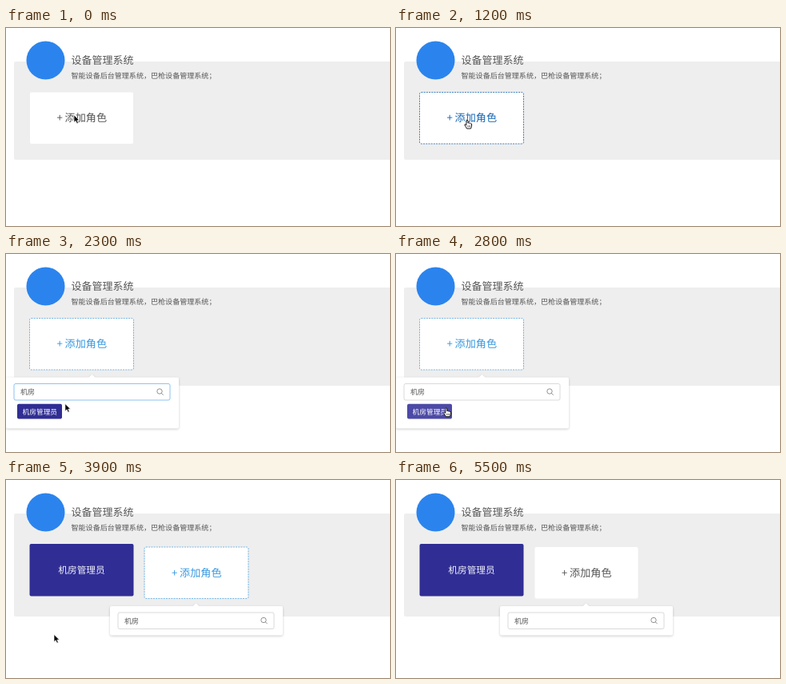
Write an HTML page that moves like this. It is 480 px wide and 248 px high and loops after 5.6 s.

```html
<!DOCTYPE html>
<html lang="zh-CN">
<head>
<meta charset="utf-8">
<title>设备管理系统</title>
<style>
html, body { margin: 0; width: 100%; height: 100%; overflow: hidden; background: #fff; }
svg { display: block; width: 100%; height: 100%; }
text { font-family: "Noto Sans CJK SC", "Noto Sans CJK", "Noto Sans", sans-serif; fill: #555; text-rendering: geometricPrecision; }
.mid { text-anchor: middle; }
.pop { filter: drop-shadow(0 1px 1.5px rgba(0, 0, 0, .2)); }
</style>
</head>
<body>
<svg viewBox="0 0 480 248">
  <rect width="480" height="248" fill="#fff"/>
  <rect id="panel" x="10" y="42" width="474" rx="2" fill="#eee"/>
  <circle cx="49.5" cy="40.5" r="24" fill="#2b84ee"/>
  <text x="81.5" y="45" font-size="13">设备管理系统</text>
  <text x="81.5" y="62.700" font-size="9.050">智能设备后台管理系统，巴枪设备管理系统；</text>

  <g id="role">
    <rect x="29.5" y="80" width="130" height="65.500" rx="2" fill="#302e94"/>
    <text class="mid" x="94.5" y="117" font-size="11.700" style="fill:#f1f1fa">机房管理员</text>
  </g>

  <g id="add">
    <rect x="30" y="80.500" width="129" height="64.500" rx="2" fill="#fff"/>
    <rect id="dash" x="29.5" y="80.500" width="130" height="64.500" rx="2" fill="none" stroke-width=".9" stroke-dasharray="2 1.2"/>
    <text id="label" class="mid" x="94.700" y="117" font-size="13.100">+ 添加角色</text>
  </g>

  <g id="popup">
    <g class="pop" fill="#fff">
      <path d="M102.500 155.500l5-4.500 5 4.500z"/>
      <rect id="card" x="0" y="154.500" width="216" rx="2"/>
    </g>
    <rect id="input" x="10" y="162.500" width="195" height="20.500" rx="2" fill="#fff" stroke-width=".9"/>
    <text id="query" x="18" y="176" font-size="9"></text>
    <g fill="none" stroke="#777" stroke-width=".8">
      <circle cx="192" cy="172" r="3.200"/>
      <path d="M194.300 174.300l2.400 2.400"/>
    </g>
    <g id="result">
      <rect id="tag" x="14" y="187.800" width="56" height="18.700" rx="2"/>
      <text class="mid" x="42.300" y="200.500" font-size="8.700" style="fill:#fff">机房管理员</text>
    </g>
  </g>

  <circle id="ring" r="20" fill="none" stroke="#222" stroke-width="1.300"/>
  <g id="arrow">
    <path d="M0 0v9.300l2.200-2 1.500 3.400 1.700-.7-1.500-3.300h2.900z" fill="#000" stroke="#fff" stroke-width=".7"/>
  </g>
  <g id="hand">
    <path d="M-1 1Q0-.600 1 1V4Q2 3.200 2.700 4.300 3.700 3.700 4.300 4.800 5.700 4.400 5.700 6 5.700 8.800 4.500 11H-.600Q-1.300 8.900-3 7-3.600 5.500-2.300 5.500L-1 6.500z" fill="#fff" stroke="#000" stroke-width=".9"/>
    <path d="M.8 7v2.300M2.300 7v2.300M3.800 7v2.300" stroke="#000" stroke-width=".5"/>
  </g>
</svg>
<script>
const LOOP = 5600, STEP = 100;
const OPEN = 1300, FOUND = 1800, CLICK = 3700, ADDED = 3900, EXIT = 5500;
const $ = id => document.getElementById(id);
const set = (id, attrs) => { for (const k in attrs) $(id).setAttribute(k, attrs[k]); };
const show = (id, on) => set(id, { opacity: +on });
const within = (t, a, b) => t >= a && t < b;
const ease = p => p * p * (3 - 2 * p);
const ramp = (t, a, b) => Math.min(1, Math.max(0, (t - a) / (b - a)));
const pulse = (t, a, b, c, d) => ramp(t, a, b) * (1 - ramp(t, c, d));
const blend = (a, b, p) => a.map((v, i) => v + (b[i] - v) * p);
const rgb = c => `rgb(${c.map(Math.round)})`;

const GREY = [85, 85, 85], BLUE = [56, 152, 224], PRESSED = [22, 103, 181];
const LINE = [214, 214, 214], FOCUS = [127, 189, 240];
const NAVY = [48, 46, 148], VIOLET = [76, 74, 166];

// time, x, y of the pointer tip
const PATH = [
  [0, 85, 109], [600, 89, 115], [1400, 89, 115], [1900, 90, 158],
  [2400, 72, 191], [2800, 62.8, 192.7], [3000, 62.5, 192.7], [3200, 60, 193.5],
  [4400, 60, 193.5], [4600, 255, 200], [4800, 400, 210], [5000, 441, 219], [5500, 447, 248]
];

function pointer(t) {
  const i = PATH.findIndex(k => k[0] > t);
  if (i < 0) return PATH[PATH.length - 1].slice(1);
  const [t0, ...from] = PATH[i - 1], [t1, ...to] = PATH[i];
  const p = ramp(t, t0, t1);
  return blend(from, to, t < 4400 ? ease(p) : p);
}

function typed(t) {
  if (t < 1500) return "";
  if (t < 1600) return "ji";
  return t < 1700 ? "ji fang" : "机房";
}

function draw(t) {
  const added = t >= ADDED;
  set("panel", { height: added ? 129 : 123 });
  show("role", added);

  const hover = pulse(t, 0, 400, ADDED, ADDED + 300);
  const press = pulse(t, 900, 1200, 1200, 1500);
  const ink = blend(blend(GREY, BLUE, hover), PRESSED, press);
  set("add", { transform: added ? "translate(143.500 3.500)" : "" });
  set("dash", { stroke: rgb(ink), opacity: hover * (.75 + .15 * press) });
  $("label").style.fill = rgb(ink);

  const found = t >= FOUND && !added;
  set("popup", { opacity: ramp(t, OPEN - 100, OPEN + 100), transform: added ? "translate(130 3.500)" : "" });
  set("card", { height: found ? 64 : 36.5 });
  set("input", { stroke: rgb(blend(LINE, FOCUS, pulse(t, 1900, 2200, 2300, 2600))) });
  $("query").textContent = typed(t);
  show("result", found);
  set("tag", { fill: rgb(blend(NAVY, VIOLET, ramp(t, 2400, 2700))) });

  const [x, y] = pointer(t);
  const isHand = within(t, 200, 1600) || within(t, 2500, ADDED);
  const move = { transform: `translate(${x} ${y})` };
  set("arrow", move);
  set("hand", move);
  show("arrow", !isHand && t < EXIT);
  show("hand", isHand);
  set("ring", { cx: x - 1, cy: y + .5 });
  show("ring", within(t, OPEN, OPEN + 100) || within(t, CLICK, ADDED));
}

function tick() {
  const t = performance.now() % LOOP;
  draw(Math.floor(t / STEP) * STEP);
  requestAnimationFrame(tick);
}
tick();
</script>
</body>
</html>
```
